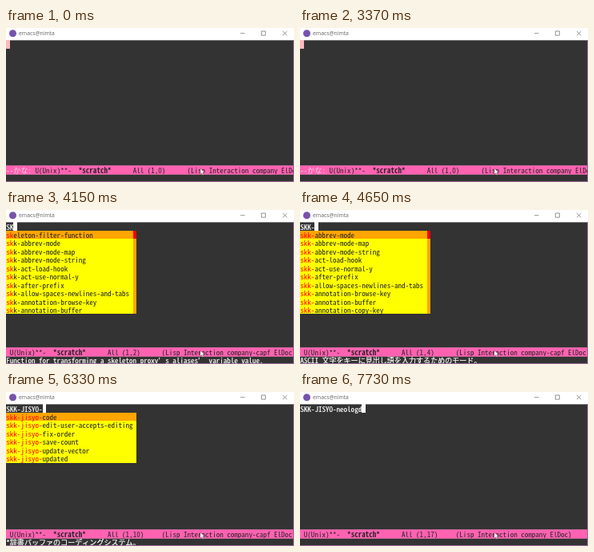
An HTML page that plays this animation: 360x193 px, repeating every 8 s.

```html
<!DOCTYPE html>
<html lang="ja">
<head>
<meta charset="utf-8">
<title>Editor completion</title>
<style>
  :root { --cell: 4.53px; --row: 10.44px; --size: 9.06px; }
  html, body { margin: 0; width: 100%; height: 100%; overflow: hidden; background: #333; }
  #stage {
    position: relative; width: 360px; height: 193px; overflow: hidden; background: #333; color: #fff;
    font: var(--size)/var(--row) "Noto Sans Mono CJK JP", "Noto Sans Mono", "DejaVu Sans Mono", monospace;
    font-kerning: none; font-variant-ligatures: none; white-space: pre;
  }
  #stage > * { position: absolute; left: 0; }
  #stage::after {
    content: ""; position: absolute; top: 15px; left: 0; width: 359px; height: 177px;
    border: solid #9c6a98; border-width: 0 1px 1px 0;
  }
  #title { top: 0; width: 360px; height: 15px; background: #fff; border-bottom: 1px solid #808080; }
  #title span {
    position: absolute; left: 16px; top: 0;
    font: 6.8px/14px "Open Sans", "Noto Sans", sans-serif; color: #666;
  }
  #title svg { position: absolute; left: 0; top: 0; }
  #line, #echo { margin-left: .3px; -webkit-text-stroke: .2px; }
  #line { top: 15.6px; height: var(--row); }
  #cursor { top: 15px; width: 4.9px; height: 11px; background: #fff; }
  #cursor.kana { background: #ffb9bd; }
  #popup { top: 26px; margin-left: .3px; background: #ff0; color: #222; }
  #popup div { height: var(--row); }
  #popup div:first-child { background: #ffa500; }
  #popup em { font-style: normal; color: #f00; }
  #track { position: absolute; right: 0; top: 0; width: var(--cell); height: 100%; background: #ffa500; }
  #thumb { display: block; background: #f00; }
  #mode {
    top: 172px; width: 360px; height: 12px; box-sizing: border-box; overflow: hidden;
    border: solid #c9659a; border-width: 1px 0; text-indent: .3px;
    background: #ff62b1; color: #2b2229;
  }
  #mode i { font-style: normal; color: #ffd0e8; }
  #echo { top: 183.2px; height: var(--row); }
  #echo i { display: inline-block; width: calc(2 * var(--cell)); font-style: normal; }
  #stage > #pointer { left: 242px; top: 175px; }
</style>
</head>
<body>
<div id="stage">
  <div id="title">
    <svg width="360" height="15" fill="none" stroke="#666" stroke-width=".7">
      <circle cx="8.5" cy="6.8" r="4.5" fill="#7654ab" stroke="none"/>
      <path d="M293 6.7h5.5M319.3 4h5v5.2h-5zM345.9 4l5.4 5.4M351.3 4l-5.4 5.4"/>
    </svg>
    <span>emacs@nimta</span>
  </div>
  <div id="line"></div>
  <div id="cursor"></div>
  <div id="popup"></div>
  <div id="mode"></div>
  <div id="echo"></div>
  <svg id="pointer" width="8" height="11">
    <path d="M1 1v7.2l1.6-1.5 1.2 2.6 1.2-.6-1.2-2.5h2.3z" fill="#fff" stroke="#444" stroke-width=".4"/>
  </svg>
</div>
<script>
const LOOP = 8000, CELL = 4.53, INSET = .3;
const $ = id => document.getElementById(id);
const withPrefix = (prefix, names) => names.split(' ').map(name => prefix + name);

const abbrev = withPrefix('skk-', 'abbrev-mode abbrev-mode-map abbrev-mode-string act-load-hook ' +
  'act-use-normal-y after-prefix allow-spaces-newlines-and-tabs annotation-browse-key annotation-buffer');
const skList = { names: ['skeleton-filter-function', ...abbrev], thumb: 1, width: 36,
  doc: 'Function for transforming a skeleton proxy<i>’</i>s aliases<i>’</i> variable value.' };
const skkList = { names: [...abbrev, 'skk-annotation-copy-key'], thumb: 1, width: 36,
  doc: 'ASCII 文字をキーに見出し語を入力するためのモード。' };
const jisList = { names: withPrefix('skk-jisx020', '1-base-rule-tree 1-mode 1-mode-string 1-orig-rule-tree ' +
  '1-roman 1-roman-rule-tree 8-latin-mode 8-latin-mode-map 8-latin-mode-string 8-latin-vector'),
  thumb: 6, width: 32, doc: '' };
const dictNames = withPrefix('skk-jisyo-',
  'code edit-user-accepts-editing fix-order save-count update-vector updated');
const dictList = { names: ['skk-jisyo', ...dictNames], width: 36,
  doc: '*SKK の個人辞書ファイル名。ファイル名とコーディングシステムのコンスセルも可' };
const codeList = { names: dictNames, width: 36, doc: '*辞書バッファのコーディングシステム。' };

// start time, typed text, extras
const steps = [
  [0, '', { kana: true }],
  [780, '', {}],
  [1530, '', { kana: true, echo: 'Use leim/ja-dic as dictionary' }],
  [3370, '', { kana: true }],
  [3530, '', {}],
  [3910, 'S', {}],
  [4030, 'SK', {}],
  [4150, 'SK', { list: skList }],
  [4270, 'SKK', { list: skkList }],
  [4650, 'SKK-', { list: skkList }],
  [5540, 'SKK-JI', { list: jisList }],
  [5680, 'SKK-JIS', { list: jisList }],
  [5810, 'SKK-JISY', { list: dictList }],
  [5930, 'SKK-JISYO', { list: dictList }],
  [6330, 'SKK-JISYO-', { list: codeList }],
  [6580, 'SKK-JISYO-n', {}],
  [6700, 'SKK-JISYO-ne', {}],
  [6980, 'SKK-JISYO-neo', {}],
  [7230, 'SKK-JISYO-neol', {}],
  [7480, 'SKK-JISYO-neolog', {}],
  [7730, 'SKK-JISYO-neologd', {}]
];

function popupHtml({ names, thumb }, typed) {
  const rows = names.map(name =>
    `<div><em>${name.slice(0, typed)}</em>${name.slice(typed)}</div>`).join('');
  const bar = thumb ? `<span id="track"><span id="thumb" style="height:${thumb * 10}%"></span></span>` : '';
  return rows + bar;
}

function show([, text, { kana, echo, list }]) {
  const column = text.length;
  $('line').textContent = text;
  $('cursor').style.left = column * CELL + INSET + 'px';
  $('cursor').className = kana ? 'kana' : '';
  $('popup').innerHTML = list ? popupHtml(list, column) : '';
  $('popup').style.width = (list ? list.width * CELL : 0) + 'px';
  $('mode').innerHTML = (kana ? '<i>--かな:</i>' : '') + ' U(Unix)**-  <b>*scratch*</b>      All ' +
    `(1,${column})`.padEnd(11) + `(Lisp Interaction company${list ? '-capf' : ''} ElDoc)`;
  $('echo').innerHTML = list ? list.doc : echo || '';
}

// Pick the font size whose advance equals one cell.
const pen = document.createElement('canvas').getContext('2d');
pen.font = '100px ' + getComputedStyle($('stage')).fontFamily;
document.documentElement.style.setProperty('--size', CELL * 100 / pen.measureText('0').width + 'px');

let current;
function tick() {
  const time = performance.now() % LOOP;
  const step = steps.findLast(([start]) => start <= time);
  if (step !== current) show(current = step);
  requestAnimationFrame(tick);
}
tick();
</script>
</body>
</html>
```
